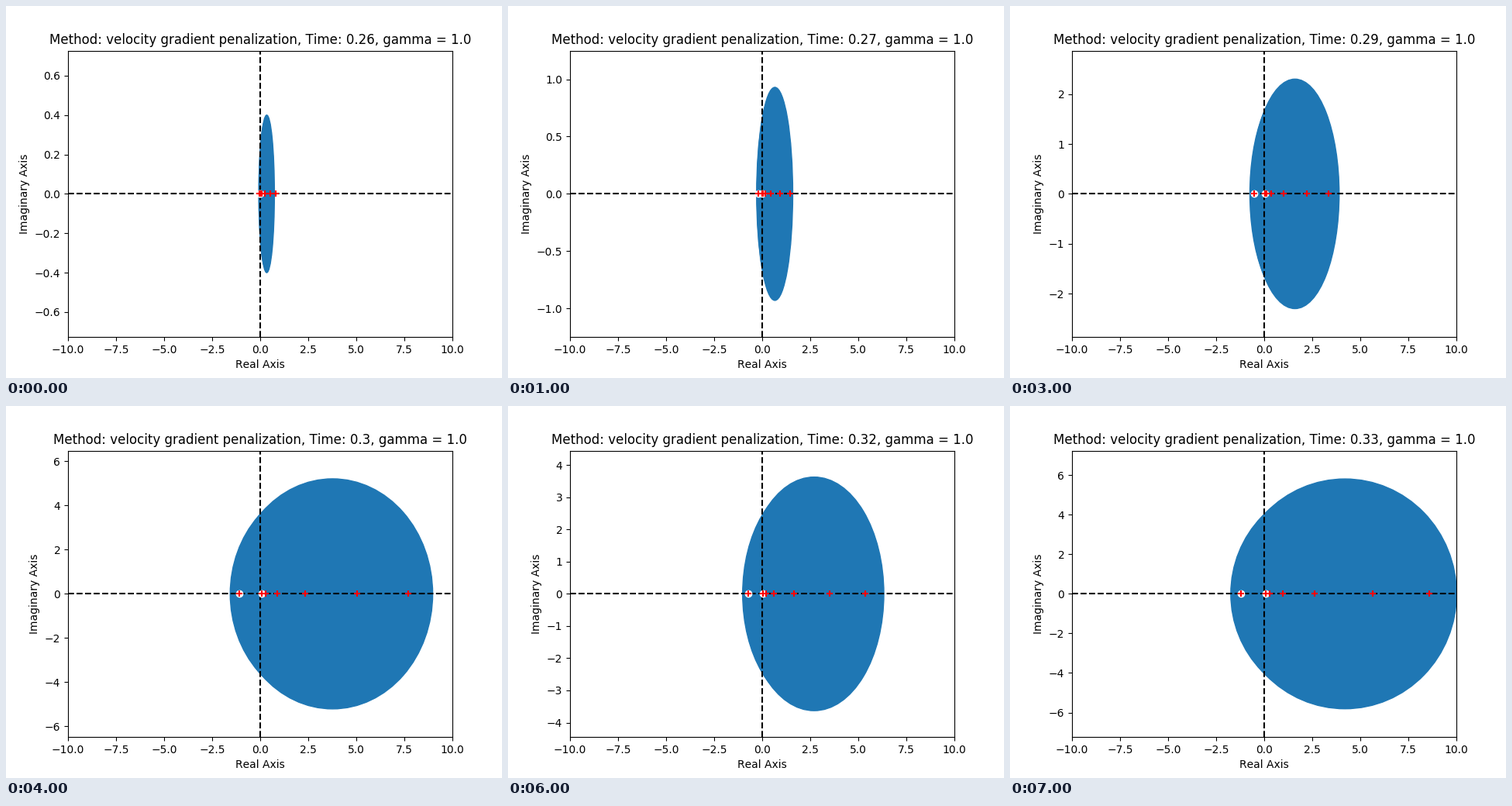
Write a matplotlib script that moves like this. It is 640 px wide and 480 px high and loops after 8000 ms.

```python
import matplotlib.pyplot as plt
import numpy as np
from matplotlib.animation import FuncAnimation

plt.rcParams["text.kerning_factor"] = 6
BLUE = "#1f77b4"

# one step of simulated time per row: disc centre, disc radius, y limit
STEPS = [
    (0.34, 0.4, 0.727),
    (0.66, 0.93, 1.25),
    (1.03, 1.455, 1.787),
    (1.6, 2.3, 2.87),
    (3.765, 5.21, 6.485),
    (2.75, 3.7, 4.53),
    (2.7, 3.63, 4.45),
    (4.2, 5.81, 7.24),
]

fig, ax = plt.subplots(figsize=(6.4, 4.8), dpi=100)


def spectrum(centre, radius, limit):
    """One negative eigenvalue, then positive ones that decay towards zero."""
    decay = np.exp(-0.42 * np.arange(6) ** 1.5)
    return np.append(0.76 * (centre - radius), 0.75 * (centre + limit) * decay)


def mark(values, marker, color):
    ax.scatter(values, np.zeros(len(values)), marker=marker, color=color,
               zorder=3)


def draw(i):
    centre, radius, limit = STEPS[i]
    time = round(0.26 + 0.01 * i, 2)
    eigs = spectrum(centre, radius, limit)
    ax.cla()
    # a smaller disc behind the main one widens the left side
    for c, r in ((centre, radius), (0.9 * centre, 0.95 * radius)):
        ax.add_patch(plt.Circle((c, 0), r, color=BLUE))
    ax.axhline(0, color="k", ls="--")
    ax.axvline(0, color="k", ls="--")
    mark(eigs[[0, -1]], "o", "white")
    mark(eigs, "+", "red")
    ax.set(xlim=(-10, 10), ylim=(-limit, limit),
           xlabel="Real Axis", ylabel="Imaginary Axis",
           title="Method: velocity gradient penalization, "
                 f"Time: {time}, gamma = 1.0")


anim = FuncAnimation(fig, draw, frames=len(STEPS), init_func=lambda: None,
                     interval=1000, repeat=True, repeat_delay=0)
plt.show()
```
